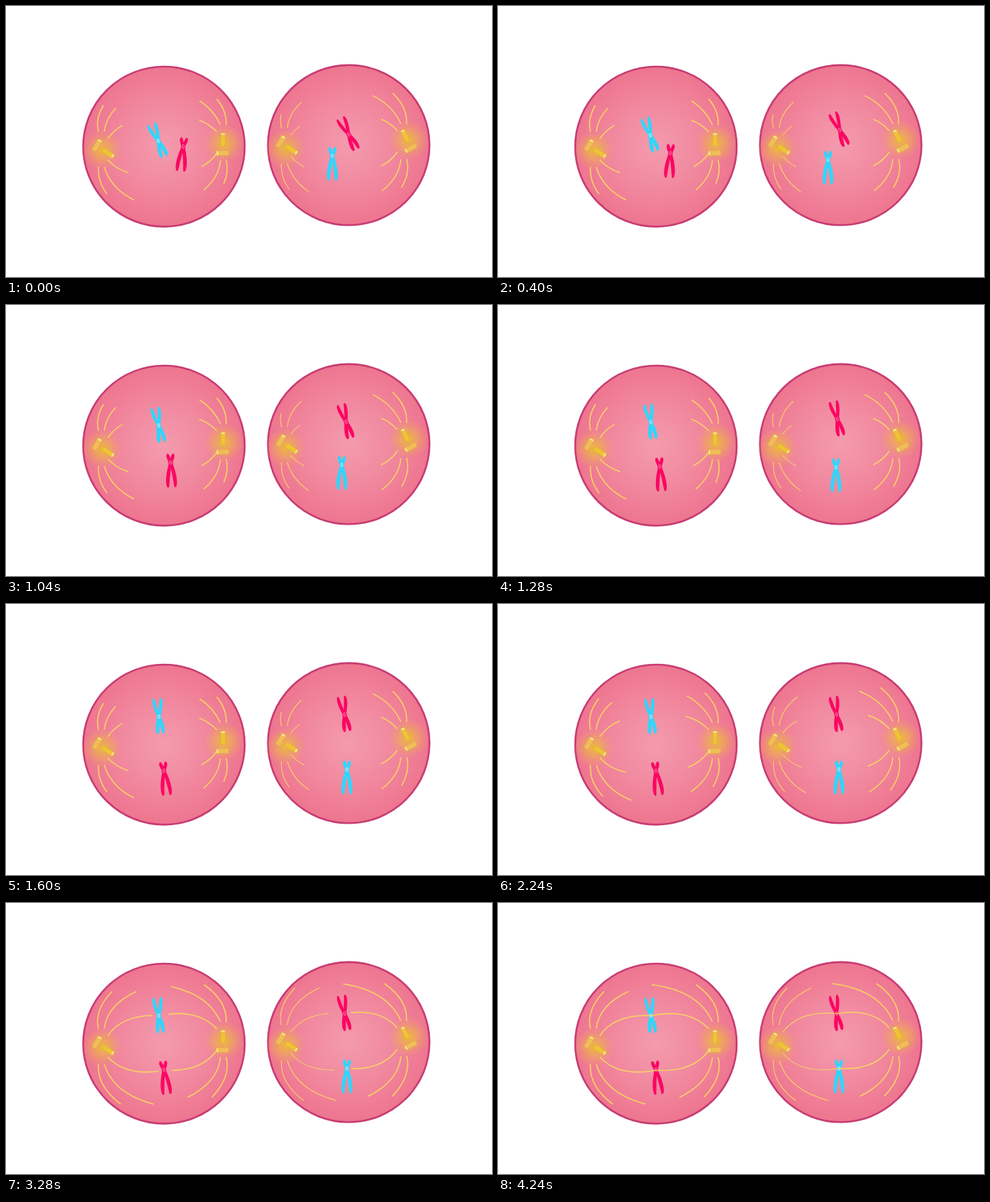
These frames come from a looping animation (680x380 px, 4.8 s). An HTML page:

```html
<!DOCTYPE html>
<html lang="en">
<head>
<meta charset="utf-8">
<title>Two cells</title>
<style>
  html, body { margin: 0; width: 100%; height: 100%; overflow: hidden; background: #fff; }
  svg { display: block; width: 100%; height: 100%; }
</style>
</head>
<body>
<svg id="stage" viewBox="0 0 680 380">
  <defs>
    <radialGradient id="cell">
      <stop offset="0" stop-color="#f49bae"/>
      <stop offset=".5" stop-color="#f18aa0"/>
      <stop offset="1" stop-color="#ee758f"/>
    </radialGradient>
    <radialGradient id="glow">
      <stop offset="0" stop-color="#ecc02c" stop-opacity=".9"/>
      <stop offset=".45" stop-color="#edb548" stop-opacity=".58"/>
      <stop offset="1" stop-color="#eea55c" stop-opacity=".06"/>
    </radialGradient>
  </defs>
</svg>
<script>
const TICK = 80, LOOP = 4800, MOVE_TICKS = 20, GROW_FROM = 25;
const GROWTH = 2.7;   // fibre length gained per tick
const BEND = .27, REACH_Y = 79;
const BLUE = '#2fd6fc', RED = '#fb0763', TAN = '#f1bd58', GOLD = '#eec433';
const stage = document.getElementById('stage');

function add(tag, attrs, parent = stage) {
  const el = document.createElementNS('http://www.w3.org/2000/svg', tag);
  for (const k in attrs) el.setAttribute(k, attrs[k]);
  parent.append(el);
  return el;
}

const mix = (a, b, p) => a + (b - a) * p;
const clamp01 = v => Math.max(0, Math.min(1, v));

function cell(cx, cy) {
  add('ellipse', { cx, cy, rx: 113, ry: 112.2, fill: 'url(#cell)', stroke: '#c73c73', 'stroke-width': 2.6 });
}

// Cylinder lying along x with its open end on the right
function cylinder(parent, transform, len, w, fill) {
  const g = add('g', { transform, stroke: '#dfa94a', 'stroke-width': .7 }, parent);
  const h = w / 2;
  add('path', { d: `M${len} ${-h}H0Q-1.6 0 0 ${h}H${len}Z`, fill }, g);
  add('ellipse', { cx: len, rx: 1.7, ry: h, fill: '#fbe78c' }, g);
}

// Two centrioles at right angles in a soft glow
function centrosome({ glow: [cx, cy], pair: [x, y, turn] }) {
  add('circle', { cx, cy, r: 26.5, fill: 'url(#glow)' });
  const g = add('g', { transform: `translate(${x} ${y}) rotate(${turn})` });
  cylinder(g, 'translate(-9.7 7.5) rotate(-93)', 15.5, 7, TAN);
  cylinder(g, '', 16.3, 6.6, GOLD);
}

// Leaf-shaped arm from the centre to (x, y), bowed outwards
function arm(parent, x, y, w, fill) {
  const len = Math.hypot(x, y), turn = Math.atan2(x, -y) * 180 / Math.PI;
  const bow = (x * y < 0 ? .055 : -.055) * len;
  const side = s => [s * w + bow, -len * .35, s * w * 1.2 + bow, -len * .8];
  const [a, b, c, d] = side(-1), [e, f, g, h] = side(1);
  add('path', {
    d: `M-1.8 1C${a} ${b} ${c} ${d} ${-w * .55} ${1 - len}Q0 ${-len - .8} ${w * .55} ${1 - len}` +
       `C${g} ${h} ${e} ${f} 1.8 1Z`,
    transform: `rotate(${turn})`, fill
  }, parent);
}

// Half spread and length of the upper and lower arms
const EVEN = { up: [5.2, 26], down: [4, 24.3] };
const LONG = { up: [4.2, 12.6], down: [5.2, 35] };

// from / to: x, y, rotation
function chromosome(shape, fill, from, to) {
  const g = add('g', {});
  for (const s of [-1, 1]) {
    arm(g, s * shape.up[0], -shape.up[1], 2.4, fill);
    arm(g, s * shape.down[0], shape.down[1], 2.7, fill);
  }
  add('ellipse', { rx: 3.2, ry: 4.5, fill }, g);
  add('ellipse', {
    rx: 1.4, ry: 2.6, fill: 'none', stroke: fill === BLUE ? '#e4f8fb' : '#f99bb8', 'stroke-width': .8
  }, g);
  return p => {
    const [x, y, r] = from.map((v, i) => mix(v, to[i], p));
    g.setAttribute('transform', `translate(${x} ${y}) rotate(${r})`);
  };
}

function fibre([x, y], [ex, ey], turn, width, first) {
  const dx = ex - x, dy = ey - y;
  const cx = x + dx * .4 + dy * BEND * turn, cy = y + dy * .4 - dx * BEND * turn;
  const el = add('path', {
    d: `M${x} ${y}Q${cx} ${cy} ${ex} ${ey}`, fill: 'none', stroke: '#f8d262', 'stroke-width': width
  });
  const full = el.getTotalLength();
  return ticks => {
    const len = Math.min(full, first + GROWTH * Math.max(0, ticks));
    el.setAttribute('stroke-dasharray', `${len} 999`);
  };
}

// Three fibres above and three below: outer, middle, and inner to a chromosome
function spindle({ hub: [hx, hy], side, width, first, ends }) {
  const reach = side > 0 ? [15, 49, 27, 73] : [27, 89, 16, 50];
  const out = [-4, 4, 9], rise = [24.5, 25, 15];
  return first.map((len, i) => {
    const low = i > 2 ? 1 : 0, v = low ? 1 : -1, k = i % 3;
    const from = [hx + side * out[k], hy - 2 + v * rise[k]];
    const to = k < 2 ? [hx + side * reach[low * 2 + k], hy + v * REACH_Y] : ends[low];
    return fibre(from, to, -v * side, width, len);
  });
}

const ENDS_A = [[214, 158], [221, 234.5]], ENDS_B = [[474, 155], [477, 232]];
const poles = [
  { hub: [133.5, 203], side: 1, width: 1.6, ends: ENDS_A, first: [39, 37, 28, 41, 64, 34],
    glow: [134.5, 202], pair: [135.5, 201.5, 33] },
  { hub: [304, 193.5], side: -1, width: 1.6, ends: ENDS_A, first: [40, 45, 30, 34, 49, 29],
    glow: [305, 193], pair: [303.7, 196, -90] },
  { hub: [389.5, 198], side: 1, width: 1.1, ends: ENDS_B, first: [20, 42, 18, 39, 51, 24],
    glow: [391, 200], pair: [392.5, 196.5, 34] },
  { hub: [556.5, 192], side: -1, width: 1.6, ends: ENDS_B, first: [49, 57, 28, 42, 53, 30],
    glow: [563, 188], pair: [562.5, 190, -116] }
];

cell(221, 197.2);
cell(479.5, 195.1);
poles.forEach(centrosome);

const chromosomes = [
  chromosome(EVEN, BLUE, [213, 189, -22], [214, 158, -6]),
  chromosome(LONG, RED, [248, 197, 6], [221, 233.7, -7]),
  chromosome(EVEN, RED, [479.5, 180, -27], [473.7, 155, -10]),
  chromosome(LONG, BLUE, [456.6, 210, 0], [477, 232, 0])
];
const fibres = poles.flatMap(spindle);

function draw(ms) {
  const tick = Math.floor((ms % LOOP) / TICK);
  chromosomes.forEach(set => set(clamp01(tick / MOVE_TICKS)));
  fibres.forEach(set => set(tick - GROW_FROM));
}

let start;
function frame(now) {
  start ??= now;
  draw(Math.max(0, now - start));
  requestAnimationFrame(frame);
}
draw(0);
requestAnimationFrame(frame);
</script>
</body>
</html>
```
